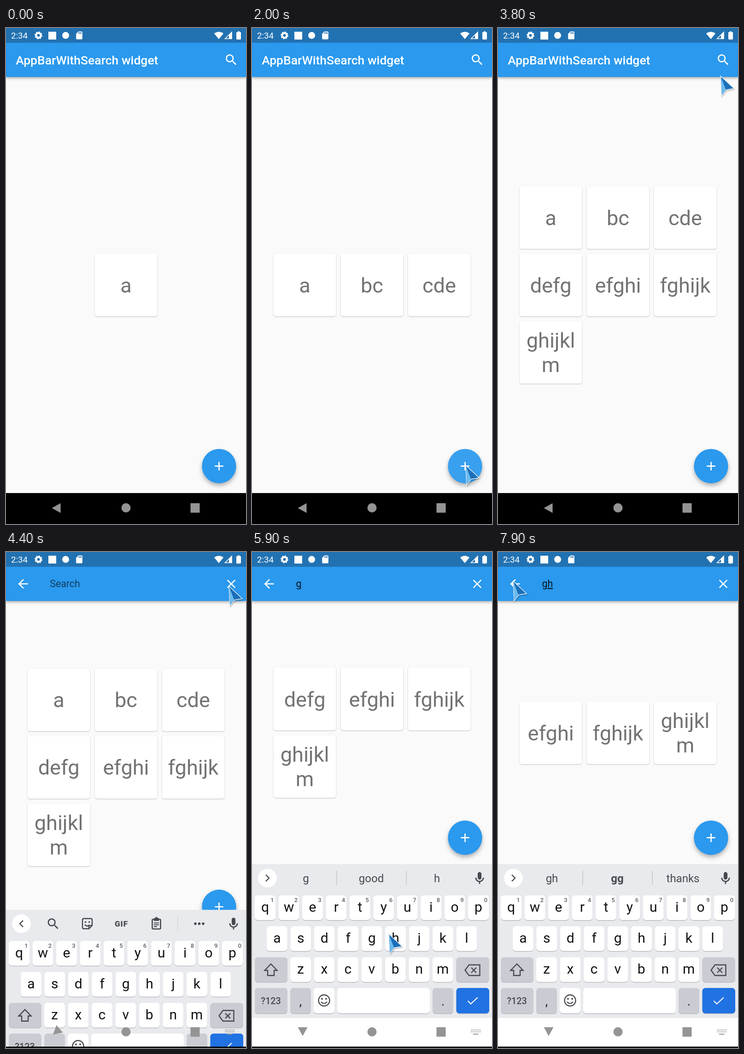
Recreate the animation shown at these times as an HTML page. Size 521x1074 px, loop 8000 ms.

```html
<!DOCTYPE html>
<html lang="en">
<head>
<meta charset="utf-8">
<title>App bar with search</title>
<style>
html, body { margin: 0; width: 100%; height: 100%; overflow: hidden; background: #000; }
svg { display: block; width: 521px; height: 1074px; font-family: Roboto, sans-serif; }
.bar { filter: drop-shadow(0 2px 3px rgba(0,0,0,.38)); }
.card { filter: drop-shadow(0 1px 1.2px rgba(0,0,0,.24)); }
.fab { filter: drop-shadow(0 5px 5px rgba(0,0,0,.3)); }
.pointer { filter: drop-shadow(1px 2px 1px rgba(0,0,0,.25)); }
</style>
</head>
<body>
<svg id="stage" viewBox="0 0 521 1074"></svg>
<script>
const LOOP = 8000, STEP = 100, DP = 1.3267;
const BLUE = '#2a99ee', INK = '#46494d', NAV = '#949494', MOD = '#cbccd3';
const BAR_END = 106, BODY_END = 1007, KEYS_TOP = 677, PITCH = 145.9, CARD = 135.4;
const SEARCH_AT = 4100, KEYS_AT = 4200, KEYS_MS = 415;
const ADD_TIMES = [0, 1800, 2000, 2200, 2400, 2500, 2700];
const QUERY = [[5500, 'g'], [6400, 'gh']];
const HINTS = { g: ['g', 'good', 'h'], gh: ['gh', 'gg', 'thanks'] };
const POINTER = [
  [900, 478, 1002], [1500, 464, 947], [3000, 464, 947], [3900, 484, 74],
  [4500, 484, 74], [4900, 258, 942], [5400, 258, 834], [5800, 258, 834],
  [5900, 297, 827], [6100, 306, 838], [6900, 306, 838], [7800, 33, 63]
];
const GLOW = [[1700, 0], [2000, .07], [2700, .14], [2900, .12], [3100, 0]];
const ICON = {
  search: 'M15.5 14h-.79l-.28-.27C15.41 12.59 16 11.11 16 9.5 16 5.91 13.09 3 9.5 3S3 5.91 3 9.5 5.91 16 9.5 16c1.61 0 3.09-.59 4.23-1.57l.27.28v.79l5 4.99L20.49 19l-4.99-5zm-6 0C7.01 14 5 11.99 5 9.5S7.01 5 9.5 5 14 7.01 14 9.5 11.99 14 9.5 14z',
  back: 'M20 11H7.83l5.59-5.59L12 4l-8 8 8 8 1.41-1.41L7.83 13H20z',
  close: 'M19 6.41L17.59 5 12 10.59 6.41 5 5 6.41 10.59 12 5 17.59 6.41 19 12 13.41 17.59 19 19 17.59 13.41 12z',
  add: 'M19 13h-6v6h-2v-6H5v-2h6V5h2v6h6z',
  mic: 'M12 14c1.66 0 3-1.34 3-3V5c0-1.66-1.34-3-3-3S9 3.34 9 5v6c0 1.66 1.34 3 3 3zM19 11h-2c0 2.76-2.24 5-5 5s-5-2.24-5-5H5c0 3.53 2.61 6.43 6 6.92V21h2v-3.08c3.39-.49 6-3.39 6-6.92z',
  sd: 'M18 2h-8L4 8v12c0 1.1.9 2 2 2h12c1.1 0 2-.9 2-2V4c0-1.1-.9-2-2-2zm-6 6h-2V4h2zm3 0h-2V4h2zm3 0h-2V4h2z'
};

const rect = (x, y, w, h, fill, extra = '') =>
  `<rect x="${x}" y="${y}" width="${w}" height="${h}" fill="${fill}" ${extra}/>`;
const circle = (x, y, r, fill, extra = '') =>
  `<circle cx="${x}" cy="${y}" r="${r}" fill="${fill}" ${extra}/>`;
const path = (d, fill, extra = '') => `<path d="${d}" fill="${fill}" ${extra}/>`;
const line = (d, color, width) => path(d, 'none', `stroke="${color}" stroke-width="${width}"`);
const text = (s, x, y, size, fill, extra = 'text-anchor="middle"') =>
  `<text x="${x}" y="${y}" font-size="${size}" fill="${fill}" ${extra}>${s}</text>`;
const icon = (name, x, y, fill, k = DP) =>
  path(ICON[name], fill, `transform="translate(${x} ${y}) scale(${k}) translate(-12 -12)"`);

const clamp = x => Math.min(1, Math.max(0, x));
const smooth = x => x * x * (3 - 2 * x);

// Values of a keyed track at time t
function track(keys, t, ease = x => x) {
  const i = keys.findIndex(k => k[0] > t);
  if (i < 0) return keys[keys.length - 1].slice(1);
  if (i === 0) return keys[0].slice(1);
  const [a, b] = [keys[i - 1], keys[i]];
  const p = ease((t - a[0]) / (b[0] - a[0]));
  return a.slice(1).map((v, j) => v + (b[j + 1] - v) * p);
}

// cubic-bezier(.4, 0, .2, 1)
function fastOut(x) {
  let lo = 0, hi = 1, u;
  for (let i = 0; i < 20; i++) {
    u = (lo + hi) / 2;
    const v = 1 - u;
    if (1.2 * v * v * u + .6 * v * u * u + u ** 3 < x) lo = u; else hi = u;
  }
  return u * u * (3 - 2 * u);
}
const keysProgress = t => {
  const x = clamp((t - KEYS_AT) / KEYS_MS);
  return x === 0 || x === 1 ? x : fastOut(x);
};

function statusBar() {
  return rect(0, 0, 521, 32, '#2272b2') +
    text('2:34', 11, 23, 18.6, '#fff', '') +
    circle(70.5, 16, 5, 'none', 'stroke="#fff" stroke-width="4"') +
    circle(70.5, 16, 7, 'none', 'stroke="#fff" stroke-width="2.8" stroke-dasharray="3 2.5"') +
    rect(92, 8, 17, 17, '#fff') + circle(129.5, 16, 7.5, '#fff') +
    icon('sd', 159, 16, '#fff', .85) +
    path('M452 12Q462 4.5 472 12L462 24z', '#fff') +
    line('M475.5 23.3L490 9v14.3z', '#fff', 1.6) + path('M484 15l6-6v14h-6z', '#fff') +
    path('M500 9h3V7h4v2h3v14q0 2-2 2h-6q-2 0-2-2z', '#fff');
}

function appBar(searching, query) {
  let s = `<g class="bar">${rect(0, 32, 521, 74, BLUE)}</g>`;
  if (!searching) {
    return s + text('AppBarWithSearch widget', 21.2, 79, 26.5, '#fff', 'font-weight="500"') +
      icon('search', 489, 69, '#fff');
  }
  s += icon('back', 37, 69, '#fff') + icon('close', 489, 69, '#fff');
  return s + (query
    ? text(query, 95.5, 76, 21.2, 'rgba(0,0,0,.87)', 'text-decoration="underline"')
    : text('Search', 95.5, 76, 21.2, 'rgba(0,0,0,.6)', ''));
}

function cards(t, query, bottom) {
  const names = ADD_TIMES.filter(at => t >= at)
    .map((_, i) => 'abcdefghijklm'.slice(i, 2 * i + 1))
    .filter(name => name.includes(query));
  const cols = Math.min(3, names.length), rows = Math.ceil(names.length / 3);
  const midY = (BAR_END + bottom) / 2;
  return names.map((name, i) => {
    const x = 260.5 + (i % 3 - (cols - 1) / 2) * PITCH;
    const y = midY + (Math.floor(i / 3) - (rows - 1) / 2) * PITCH;
    const lines = name.match(/.{1,6}/g);
    return `<g class="card">${rect(x - CARD / 2, y - CARD / 2, CARD, CARD, '#fff', 'rx="5"')}</g>` +
      lines.map((l, n) =>
        text(l, x, y + 16 + (n - (lines.length - 1) / 2) * 52.9, 45.1, '#737373')).join('');
  }).join('');
}

function fab(t, bottom) {
  const y = bottom - 58.3;
  return `<g class="fab">${circle(462.5, y, 37.2, BLUE)}</g>` +
    circle(462.5, y, 37.2, '#fff', `opacity="${track(GLOW, t)[0]}"`) +
    icon('add', 462.5, y, '#fff');
}

const key = (x, y, w, fill = '#fff', h = 53.5) =>
  rect(x, y + 1.4, w, h, '#b9bbc0', 'rx="6.5"') + rect(x, y, w, h, fill, 'rx="6.5"');

function letterRow(letters, x0, y) {
  return [...letters].map((c, i) => {
    const x = x0 + i * 51.45;
    return key(x - 22.5, y, 45) + text(c, x, y + 35.5, 30, '#111');
  }).join('');
}

function toolStrip() {
  return line('M37 699l-7 7 7 7', INK, 2.4) + icon('search', 102.5, 706.5, INK) +
    line('M180 717h-11q-3 0-3-3v-16q0-3 3-3h15q3 0 3 3v12zM180 717v-7h7M171 708q5 6 9 1', INK, 2.4) +
    circle(172.5, 702.5, 1.8, INK) + circle(180.5, 702.5, 1.8, INK) +
    text('GIF', 250.5, 712, 17, INK, 'text-anchor="middle" font-weight="900" letter-spacing="1"') +
    rect(317.5, 696.5, 18, 21, 'none', `rx="2" stroke="${INK}" stroke-width="2.6"`) +
    rect(321, 694, 11, 6, INK) + circle(326.5, 694, 2.6, INK) +
    line('M321 704.5h11M321 708.5h11M321 712.5h7', INK, 2) +
    rect(372, 691, 1.3, 30, '#cfd1d5') +
    [411, 419.5, 428].map(x => circle(x, 706, 2.8, INK)).join('');
}

function hintStrip(query) {
  return line('M30 699l7 7-7 7', INK, 2.4) +
    rect(183.3, 690, 1.3, 31, '#bfc1c5') + rect(334.5, 690, 1.3, 31, '#bfc1c5') +
    HINTS[query].map((word, i) => text(word, [117, 259, 401.5][i], 715, 24, INK,
      `text-anchor="middle" font-weight="${word === 'gg' ? 700 : 400}"`)).join('');
}

function keyboard(query) {
  const digits = [...'1234567890'].map((d, i) =>
    text(d, 44 + i * 51.5, 758, 13, '#5c5f63', 'text-anchor="middle" font-weight="500"')).join('');
  return rect(0, 676, 521, 333, '#e8eaed') + rect(0, 1009, 521, 470, '#fff') +
    circle(33.5, 706, 20.3, '#fff') + (query ? hintStrip(query) : toolStrip()) +
    icon('mic', 494, 706.5, INK, 1.36) +
    letterRow('qwertyuiop', 28.5, 743.5) + digits +
    letterRow('asdfghjkl', 54.3, 810.5) + letterRow('zxcvbnm', 105.5, 877.5) +
    key(6, 877.5, 71, MOD) + key(443.5, 877.5, 71.5, MOD) +
    line('M41 892L27.5 906H34v11h14v-11h6.5z', INK, 2.4) +
    line('M471 894h23.5v23H471l-8.5-11.5zM476 900l11 11M487 900l-11 11', INK, 2.4) +
    key(6, 944, 71, MOD, 55) + key(83, 944, 45, MOD, 55) + key(134, 944, 45, '#fff', 55) +
    key(185, 944, 201, '#fff', 55) + key(392, 944, 45, MOD, 55) + key(443.5, 944, 71.5, '#2172e2', 55) +
    text('?123', 41, 979, 19.8, INK, 'text-anchor="middle" font-weight="500"') +
    text(',', 105.5, 982, 27, '#222') + text('.', 414.5, 982, 27, '#222') +
    circle(156.5, 971, 12, 'none', `stroke="${INK}" stroke-width="2.4"`) +
    circle(152, 967.5, 2, INK) + circle(161, 967.5, 2, INK) +
    line('M150 974q6.500 7 13 0', INK, 2.2) + line('M468.500 972l6.500 6.500 15-14', '#fff', 2.2);
}

function navIcons(p) {
  const dots = [1035, 1039].map(y =>
    `<path d="M475.500 ${y}h20.500" stroke="${NAV}" stroke-width="2" stroke-dasharray="2 1.700"/>`).join('') +
    line('M480 1044h11.500', NAV, 2);
  return path('M-10.500 0L8.500-10.500v21z', NAV,
    `transform="translate(110 ${1039.5 - 2 * p}) rotate(${-90 * clamp(p * .6 + Math.max(0, p - .75) * 1.6)})"`) +
    circle(260.5, 1039, 10, NAV) + rect(400.5, 1029, 20, 20.5, NAV, 'rx="1"') +
    (p > 0 ? dots : '');
}

function pointer(t) {
  if (t < POINTER[0][0]) return '';
  const [x, y] = track(POINTER, t, smooth);
  return `<g class="pointer" transform="translate(${x} ${y})">` +
    path('M0 0L29 27 12 30 2 43z', '#1b6fb8', 'stroke="#e4f1fb" stroke-width="1.400"') +
    path('M1 3L11 29 3 40z', '#6dbdf0') + '</g>';
}

function scene(t) {
  const query = QUERY.reduce((q, [at, s]) => t >= at ? s : q, '');
  const p = keysProgress(t);
  // The page resizes slightly behind the sliding keyboard
  const bottom = Math.min(BODY_END, KEYS_TOP + 397 * (1 - keysProgress(t - 32)));
  return rect(0, 0, 521, 1074, '#fafafa') +
    cards(t, query, bottom) + fab(t, bottom) +
    appBar(t >= SEARCH_AT, query) + statusBar() +
    rect(0, BODY_END, 521, 67, '#000') +
    (p > 0 ? `<g transform="translate(0 ${398 * (1 - p)})">${keyboard(query)}</g>` : '') +
    rect(0, 1071, 521, 3, '#000') + navIcons(p) + pointer(t);
}

const stage = document.getElementById('stage');
const start = performance.now();
let shown = -1;
function tick() {
  const t = Math.floor((performance.now() - start) % LOOP / STEP) * STEP;
  if (t !== shown) stage.innerHTML = scene(shown = t);
  requestAnimationFrame(tick);
}
tick();
</script>
</body>
</html>
```
